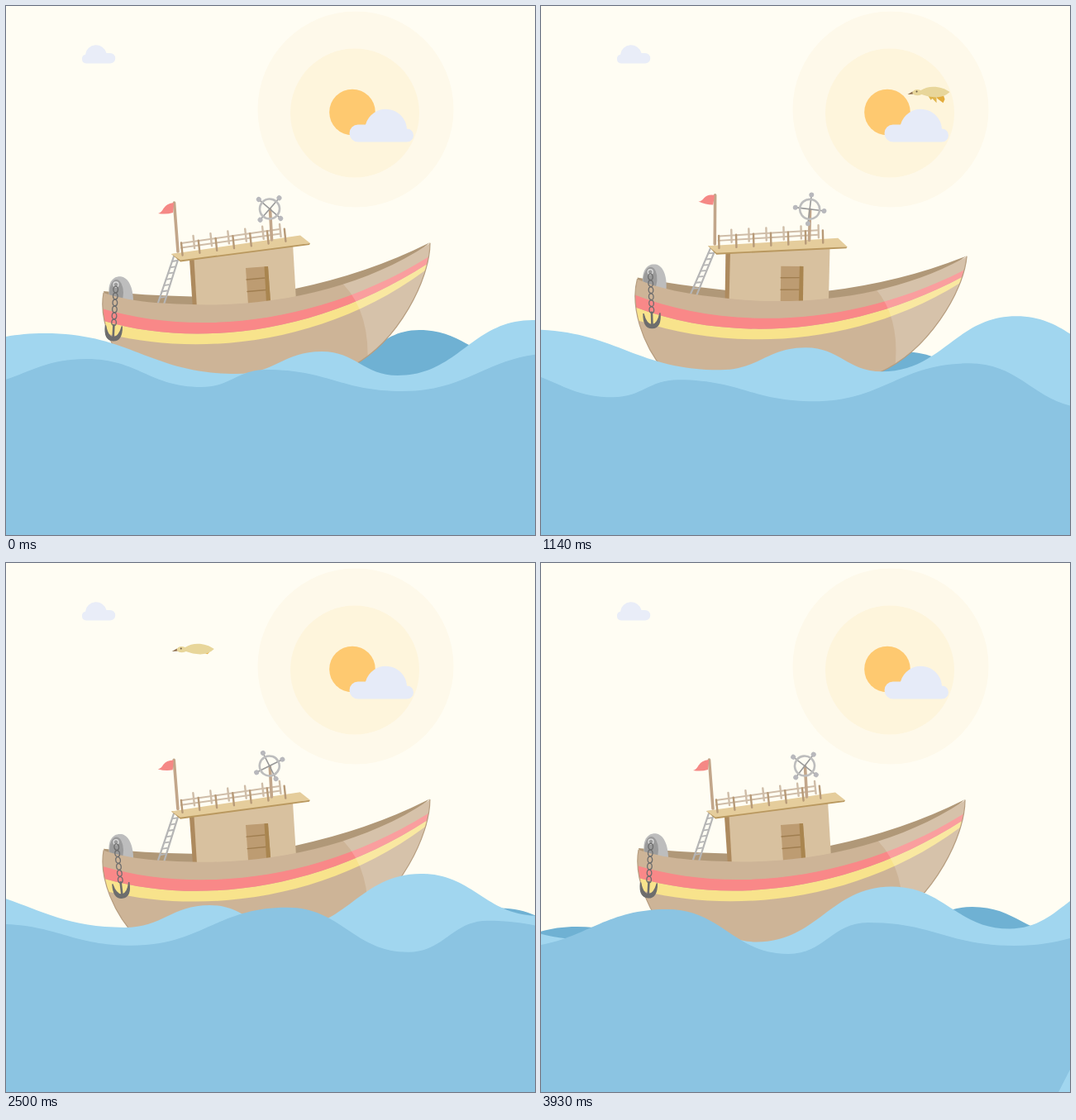
Animation of 640 by 640 pixels, one loop 4000 ms. Source, as an HTML page:

```html
<!DOCTYPE html>
<html lang="en">
<head>
<meta charset="utf-8">
<title>Boat at sea</title>
<style>
html, body { margin: 0; height: 100%; overflow: hidden; background: #fffdf3; }
svg { display: block; width: 100vw; height: 100vh; }
.line { fill: none; stroke-linecap: round; }
</style>
</head>
<body>
<svg viewBox="0 0 640 640">
  <defs>
    <path id="hull" d="M118 347C155 360 205 361 250 361.500C345 360 440 336 513 287C513 330 475 405 420 435C380 462 200 490 160 455C130 425 112 380 118 347Z"/>
    <clipPath id="inHull"><use href="#hull"/></clipPath>
  </defs>

  <circle cx="423" cy="125" r="118.500" fill="#fef9ea"/>
  <circle cx="422" cy="129.500" r="78" fill="#fef5dc"/>
  <circle cx="419" cy="128.500" r="27.800" fill="#fec970"/>
  <path fill="#e6ebf8" d="M426 164.500a10.500 10.500 0 0 1 0-21h9A25.500 25.500 0 0 1 485 148.500a8 8 0 0 1 0 16Z"/>
  <path fill="#e9edf8" d="M97 69.500a5.500 5.500 0 0 1-1-10.800A13 13 0 0 1 121.500 57h4.500a6.200 6.200 0 0 1 0 12.500Z"/>

  <g id="bird">
    <g id="wings">
      <path fill="#dfb54e" d="M22 0L28 11 30 9 35 15 35 0Z"/>
      <path fill="#e3ac3c" d="M32 0L36 9 43 15 45 10 42 0Z"/>
    </g>
    <path fill="#8a6a4c" d="M0 3L6-.5 7 2.500Z"/>
    <path fill="#e8d69a" d="M6 0Q9-5 16-2C26-9 42-7 51 0C42 9 28 7 17 3Q10 6 6 2Z"/>
    <circle cx="11" cy="-.5" r="1" fill="#6d5a44"/>
  </g>

  <path id="back" fill="#6fb1d3"/>

  <g id="boat">
    <path fill="#b09878" d="M118 345Q165 350 225 351.500L350 342Q440 323 513 286L440 345 230 372H125Z"/>
    <g class="line" stroke="#b5b5b5" stroke-width="2.200">
      <path d="M203 303L184 359M209 304L191 361"/>
      <path id="rungs" stroke-width="1.800"/>
    </g>
    <path fill="#bdbdbd" d="M125 352C122 334 130 326 140 327.500C150 330 154 344 154 358Z"/>
    <ellipse cx="133.500" cy="347" rx="8.500" ry="16" fill="#9b9b9b"/>

    <path fill="#d8c19f" d="M225 306L347 288 351 356 229 368Z"/>
    <path fill="#ad8a5e" d="M222 307L227.500 306 231 366 226 366Z"/>
    <path fill="#bd9c72" d="M290 317L317 315 320 357 293 361Z"/>
    <path fill="#a9854f" d="M312.500 315.300L317 315 320 357 315 359Z"/>
    <path class="line" stroke="#a07e50" stroke-width="1.300" d="M291 331L313 329M292 345.500L314 343.500"/>

    <g class="line" stroke="#cfbda8" stroke-width="2.400">
      <path d="M212 287L331 270M212 292.500L332 275.500" stroke-width="2"/>
      <path id="farPosts"/>
    </g>
    <path fill="#b9985f" d="M200 300L368 287 367 289 211 309.500Z"/>
    <path fill="#e5cd9c" d="M200 300L356 277.500 368 287 211 307.500Z"/>
    <path id="nearPosts" class="line" stroke="#b79a78" stroke-width="2.400"/>
    <path class="line" stroke="#c2a68a" stroke-width="3.600" stroke-linecap="butt" d="M203.500 238L208 297M319.500 246L321.500 283"/>
    <g id="flag"><path fill="#f58885" d="M0 1Q-9 2-12.500 8Q-15 13-19 14Q-9 15.500-1 13Z"/></g>
    <g id="helm" class="line">
      <path d="M-18 0H18M0-18V18" stroke="#999" stroke-width="1.600"/>
      <circle r="12" stroke="#bdbdbd" stroke-width="2.600"/>
      <path d="M-17.500 0h0M17.500 0h0M0-17.500v0M0 17.500v0" stroke="#b8b8bc" stroke-width="6"/>
    </g>

    <use href="#hull" fill="#cdb497"/>
    <g clip-path="url(#inHull)">
      <path fill="#f8e38c" d="M100 374L118 381C232 414 380 396 511 311L530 300 507 320C385 410 235 424 124 397L100 390Z"/>
      <path fill="#f98888" d="M100 360L116 366C230 400 380 385 512 303L530 290 511 311C380 396 232 414 118 381L100 375Z"/>
      <path fill="#fff" fill-opacity=".18" d="M399 328Q440 362 437.500 430H560V270Z"/>
    </g>
    <path class="line" stroke="#b79e80" stroke-width="1.200" d="M513 287C513 330 475 405 420 435M118 347C112 380 130 425 160 455"/>

    <g id="anchor" class="line" stroke="#6d6d6d" stroke-width="1.300">
      <circle r="3" stroke="#ddd"/>
      <g id="links"></g>
      <path d="M0 49V65" stroke-width="2.600"/>
      <path fill="#6d6d6d" d="M-10 50Q-7 63.500 0 64Q7 63.500 10 50Q11 68 0 68Q-11 68-10 50Z"/>
    </g>
  </g>

  <path id="middle" fill="#a1d6ef"/>
  <path id="front" fill="#8bc4e2"/>
</svg>
<script>
const LOOP = 4000;
const el = id => document.getElementById(id);
const move = (id, transform) => el(id).setAttribute('transform', transform);
const shape = (id, d) => el(id).setAttribute('d', d);

// Smooth line through crests and troughs, closed far below.
function wave(points, closing) {
  let [x0, y0] = points[0], d = `M${x0} ${y0}`;
  for (const [x, y] of points.slice(1)) {
    const pull = (x - x0) * .45;
    d += `C${x0 + pull} ${y0} ${x - pull} ${y} ${x} ${y}`;
    [x0, y0] = [x, y];
  }
  return d + closing + `H${points[0][0]}Z`;
}

shape('back', wave([[-520, 20], [-380, 50], [-248, 24], [-120, 50], [0, 0], [120, 36],
  [230, 0], [350, 35], [480, 0]], 'V300'));
shape('middle', wave([[-800, 60], [-585, 16], [-353, 65], [-250, 38], [-158, 67], [5, 0],
  [148, 51], [280, -5]], 'V300'));
shape('front', wave([[-720, 40], [-570, 7], [-431, 41], [-352, 20], [-188, 46], [0, 0],
  [147, 54], [243, 16], [420, 44], [577, 20]], 'L433 300'));

const repeat = (n, make) => Array.from({ length: n }, (_, i) => make(i)).join('');
shape('rungs', repeat(7, i => `M${201 - i * 2.5} ${309 + i * 7.3}l6 -1`));
shape('farPosts', repeat(6, i => `M${226.5 + i * 20.9} ${278 - i * 2.8}l1.600 15`));
shape('nearPosts', repeat(7, i => `M${212 + i * 20.8} ${286.500 - i * 2.8}l1.600 15`));
el('links').innerHTML = repeat(6, i => `<ellipse cy="${6 + i * 8}" rx="2.800" ry="3.800"/>`);

// Eased value at time t between [time, value] keys.
function ease(t, ...keys) {
  const i = Math.max(1, keys.findIndex(k => k[0] >= t));
  const [t0, a] = keys[i - 1], [t1, b] = keys[i];
  const u = (t - t0) / (t1 - t0);
  return a + (b - a) * u * u * (3 - 2 * u);
}

function draw(now) {
  const t = now % LOOP;
  const flap = .35 + Math.cos((t - 5) / 400 * 2 * Math.PI);
  const tilt = ease(t, [0, 0], [1333, 5], [2850, -1], [LOOP, 0]);
  const swing = ease(t, [0, 3], [1700, -10], [LOOP, 3]);
  const flutter = ease(t % 2000, [0, 0], [1000, 12], [2000, 0]);

  move('bird', `translate(${647.2 - .1785 * t} 104)`);
  move('wings', `scale(1 ${flap})`);
  move('boat', `rotate(${tilt} 318 320)`);
  move('helm', `translate(319 245.5) rotate(${t * .045 - 49})`);
  move('flag', `translate(203 237) skewY(${flutter})`);
  move('anchor', `translate(133 337) rotate(${swing})`);

  move('back', `translate(${500 - .053 * t} ${
    ease(t, [0, 392], [900, 417], [1900, 427], [2860, 413], [LOOP, 416])})`);
  move('middle', `translate(${632 - .0542 * t} ${
    ease(t, [0, 380], [1950, 372.5], [LOOP, 391.5])})`);
  move('front', `translate(${667.5 - .131 * t} ${
    ease(t, [0, 420], [650, 435], [2750, 416], [LOOP, 419])})`);
}

const start = performance.now();
function tick() {
  draw(performance.now() - start);
  requestAnimationFrame(tick);
}
tick();
</script>
</body>
</html>
```
